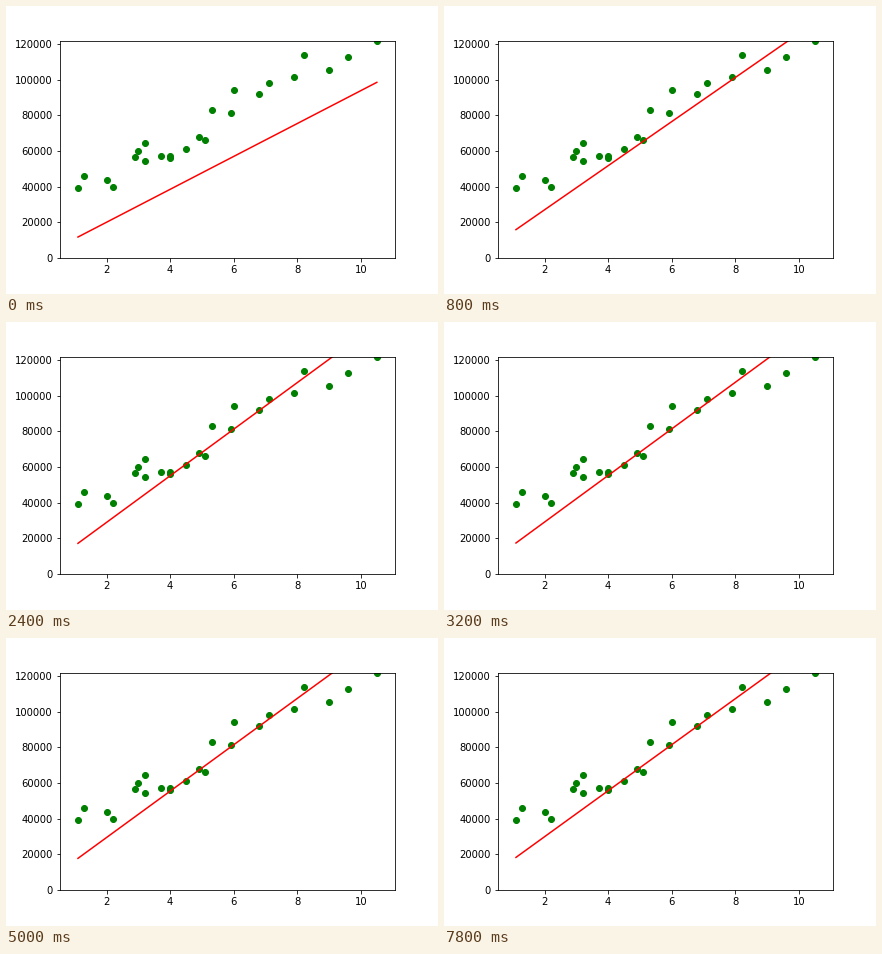
Write a matplotlib script that moves like this. It is 432 px wide and 288 px high and loops after 8 s.

```python
import numpy as np
import matplotlib.pyplot as plt
from matplotlib.animation import FuncAnimation

FRAMES, INTERVAL = 40, 200
RATE, WARMUP = 0.01, 3

x = np.array([1.1, 1.3, 2.0, 2.2, 2.9, 3.0, 3.2, 3.2, 3.7, 4.0, 4.0, 4.5,
              4.9, 5.1, 5.3, 5.9, 6.0, 6.8, 7.1, 7.9, 8.2, 9.0, 9.6, 10.5])
y = np.array([39343, 46205, 43525, 39891, 56642, 60150, 54445, 64445,
              57189, 55794, 56957, 61111, 67938, 66029, 83088, 81363,
              93940, 91738, 98273, 101302, 113812, 105582, 112635, 121872])


def descend(steps):
    """Slope and intercept after each gradient descent step."""
    m = c = 0.0
    path = []
    for _ in range(steps):
        err = y - (m * x + c)
        m, c = m + RATE * np.mean(err * x), c + RATE * np.mean(err)
        path.append((m, c))
    return path


fits = descend(FRAMES + WARMUP)[WARMUP - 1:]

plt.rcParams["font.family"] = "DejaVu Sans"
fig, ax = plt.subplots(figsize=(6, 4), dpi=72, facecolor="white")
fig.subplots_adjust(left=0.125, right=0.9, bottom=0.125, top=0.88)
ax.scatter(x, y, color="green")
line, = ax.plot([], [], color="red")
ax.set_xlim(0.535, 11.065)
ax.set_ylim(0, y.max())
ax.set_xticks(range(2, 11, 2))
ax.set_yticks(range(0, 120001, 20000))


def update(i):
    m, c = fits[i]
    line.set_data(x, m * x + c)
    return line,


anim = FuncAnimation(fig, update, frames=FRAMES, interval=INTERVAL,
                     repeat=True, repeat_delay=0)
plt.show()
```
